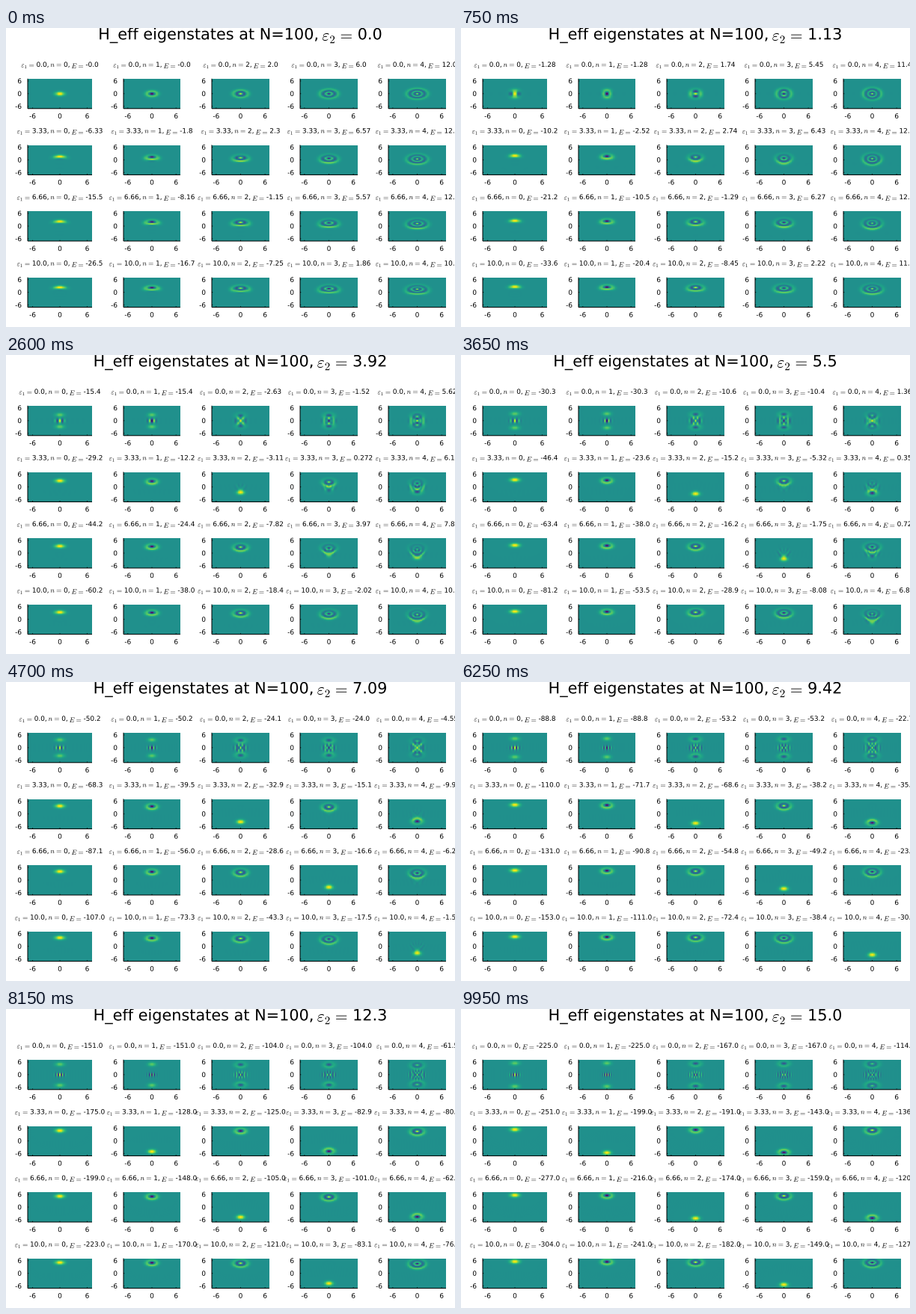
A matplotlib script for the animation above (10 s loop, 600x400 px).

```python
import math

import matplotlib.pyplot as plt
import numpy as np
from matplotlib.animation import FuncAnimation
from matplotlib.collections import LineCollection
from matplotlib.patches import PathPatch
from matplotlib.path import Path
from matplotlib.textpath import TextPath

plt.rcParams["font.family"] = "DejaVu Sans"
plt.rcParams["mathtext.fontset"] = "cm"

WIDTH, HEIGHT = 600, 400
FRAMES, INTERVAL = 200, 50

# Physics: H = a+^2 a^2 - eps2 (a+^2 + a^2) - eps1 (a+ + a)
LEVELS = 70
STATES = 5
EPS1 = [0.0, 3.33, 6.66, 10.0]
EPS2_MAX = 15.0

# Phase-space grid
POINTS, REACH = 100, 64
STEP = 14 / (POINTS - 1)
SPAN = STEP * POINTS / 2

# Panel boxes in whole pixels, and the exact height of their x axes
COLS = [(29, 115), (157, 233), (275, 352), (393, 470), (511, 588)]
ROWS = [(68, 108), (157, 197), (245, 285), (334, 374)]
FLOORS = [107.8 + 88.6 * r for r in range(len(ROWS))]
PANEL_H = 40

SMALL, LARGE = 8.9, 20.8
EPS_1 = r"$\varepsilon_1\hspace{0.08}=$"
EPS_2 = r"$\varepsilon_2\hspace{0.08}=$"
N_IS = r"$n\hspace{0.08}=$"
E_IS = r"$E\hspace{0.08}=$"
DROP = {EPS_1: 0.07, EPS_2: 0.07, N_IS: 0.0, E_IS: 0.22}
MATH_SCALE, MATH_SHIFT = 1.03, -0.11


# ---- text as outlines -------------------------------------------------

glyph_cache = {}


def right_edge(text):
    return TextPath((0, 0), text, size=1).vertices[:, 0].max()


def glyph(piece):
    """Vertices, codes and advance of a character or formula at size 1."""
    if piece not in glyph_cache:
        if piece in DROP:
            path = TextPath((0, 0), piece, size=MATH_SCALE)
            verts = path.vertices + [MATH_SHIFT, -DROP[piece]]
            advance = verts[:, 0].max() + 0.056
            glyph_cache[piece] = verts, path.codes, advance
        else:
            # the bar has no kerning pairs
            advance = right_edge(piece + "|") - right_edge("|")
            if piece == " ":
                glyph_cache[piece] = None, None, advance
            else:
                path = TextPath((0, 0), piece, size=1)
                glyph_cache[piece] = path.vertices, path.codes, advance
    return glyph_cache[piece]


def layout(pieces, size, x, y, align=0.5):
    """Outlines of a line of text; align 0.5 centres it, 1 ends it at x."""
    chars = []
    for piece in pieces:
        chars += [piece] if piece in DROP else list(piece)
    glyphs = [glyph(c) for c in chars]
    pen = x - align * size * sum(g[2] for g in glyphs)
    out = []
    for verts, codes, advance in glyphs:
        if verts is not None:
            out.append((verts * [size, -size] + [pen, y], codes))
        pen += size * advance
    return out


def merge(outlines):
    return Path(np.concatenate([v for v, _ in outlines]),
                np.concatenate([c for _, c in outlines]))


def three_digits(value):
    return repr(float(f"{round(value, 7):.3g}") or -0.0)


# ---- eigenstates and Wigner functions ---------------------------------

num = np.arange(LEVELS)
lower = np.diag(np.sqrt(num[1:]), 1)
squeeze = lower @ lower + (lower @ lower).T
drive = lower + lower.T
kerr = np.diag(num * (num - 1.0))
# a tiny parity term keeps degenerate pairs in a fixed order, even first
kerr -= 1e-8 * np.diag((-1.0) ** num)
base = np.stack([kerr - e * drive for e in EPS1])


def oscillator_states(x):
    phi = np.zeros((LEVELS, x.size))
    phi[0] = math.pi ** -0.25 * np.exp(-x * x / 2)
    phi[1] = math.sqrt(2) * x * phi[0]
    for n in range(2, LEVELS):
        phi[n] = (math.sqrt(2 / n) * x * phi[n - 1]
                  - math.sqrt((n - 1) / n) * phi[n - 2])
    return phi


wide = (np.arange(-REACH, POINTS + REACH) - (POINTS - 1) / 2) * STEP
phi = oscillator_states(wide)
momenta = wide[REACH:REACH + POINTS]
shift = np.arange(REACH + 1)
here = np.arange(POINTS)[:, None] + REACH
ahead, behind = here + shift, here - shift
kernel = 2 * np.cos(2 * np.outer(shift * STEP, momenta)) * STEP / math.pi
kernel[0] /= 2


def wigner(coeffs):
    """Rows follow position, columns follow momentum."""
    psi = coeffs @ phi
    return (psi[ahead] * psi[behind]) @ kernel


def nearest(pixels):
    return ((np.arange(pixels) + 0.5) / pixels * POINTS).astype(int)


# ---- figure -----------------------------------------------------------

fig = plt.figure(figsize=(6, 4), dpi=100, facecolor="white")
ax = fig.add_axes([0, 0, 1, 1])
ax.axis("off")

field = np.full((HEIGHT, WIDTH), np.nan)
image = ax.imshow(field, cmap="viridis", vmin=-1 / math.pi, vmax=1 / math.pi,
                  interpolation="nearest", aspect="auto",
                  extent=(0, WIDTH, HEIGHT, 0))
ax.set_xlim(0, WIDTH)
ax.set_ylim(HEIGHT, 0)

lines, labels = [], []
for floor in FLOORS:
    for left, right in COLS:
        cx, cy = (left + right) / 2, floor - PANEL_H / 2
        lines.append([(left, floor - PANEL_H), (left, floor)])
        lines.append([(left, floor), (right, floor)])
        for tick in (-6, 0, 6):
            x = cx + tick / SPAN * (right - left) / 2
            y = cy - tick / SPAN * PANEL_H / 2
            lines.append([(x, floor), (x, floor - 1.2)])
            lines.append([(left, y), (left + 1.2, y)])
            labels += layout([str(tick)], SMALL, x, floor + 13.1)
            labels += layout([str(tick)], SMALL, left - 8, y + 3.2, 1)

ax.add_collection(LineCollection(lines, colors="black", linewidths=0.72,
                                 snap=False), autolim=False)
ax.add_patch(PathPatch(merge(labels), fc="black", lw=0, snap=False))
titles = PathPatch(merge(labels), fc="black", lw=0, snap=False)
ax.add_patch(titles)


def update(frame):
    eps2 = EPS2_MAX * frame / (FRAMES - 1)
    energies, vectors = np.linalg.eigh(base - eps2 * squeeze)

    eps2_text = repr(float(f"{eps2:.3g}"))
    text = layout(["H_eff eigenstates at N=100, ", EPS_2, " " + eps2_text],
                  LARGE, 313, 15.3)
    for r, (top, bottom) in enumerate(ROWS):
        rows = nearest(bottom - top)[::-1]
        for n, (left, right) in enumerate(COLS[:STATES]):
            w = wigner(vectors[r, :, n])
            field[top:bottom, left:right] = w[np.ix_(rows, nearest(right - left))]
            text += layout([EPS_1, f" {EPS1[r]}, ", N_IS, f" {n}, ",
                            E_IS, " " + three_digits(energies[r, n])],
                           SMALL, (left + right) / 2 + 0.5, FLOORS[r] - 55.9)
    image.set_data(field)
    titles.set_path(merge(text))
    return image, titles


anim = FuncAnimation(fig, update, frames=FRAMES, interval=INTERVAL,
                     repeat=True, repeat_delay=0, cache_frame_data=False)
plt.show()
```
